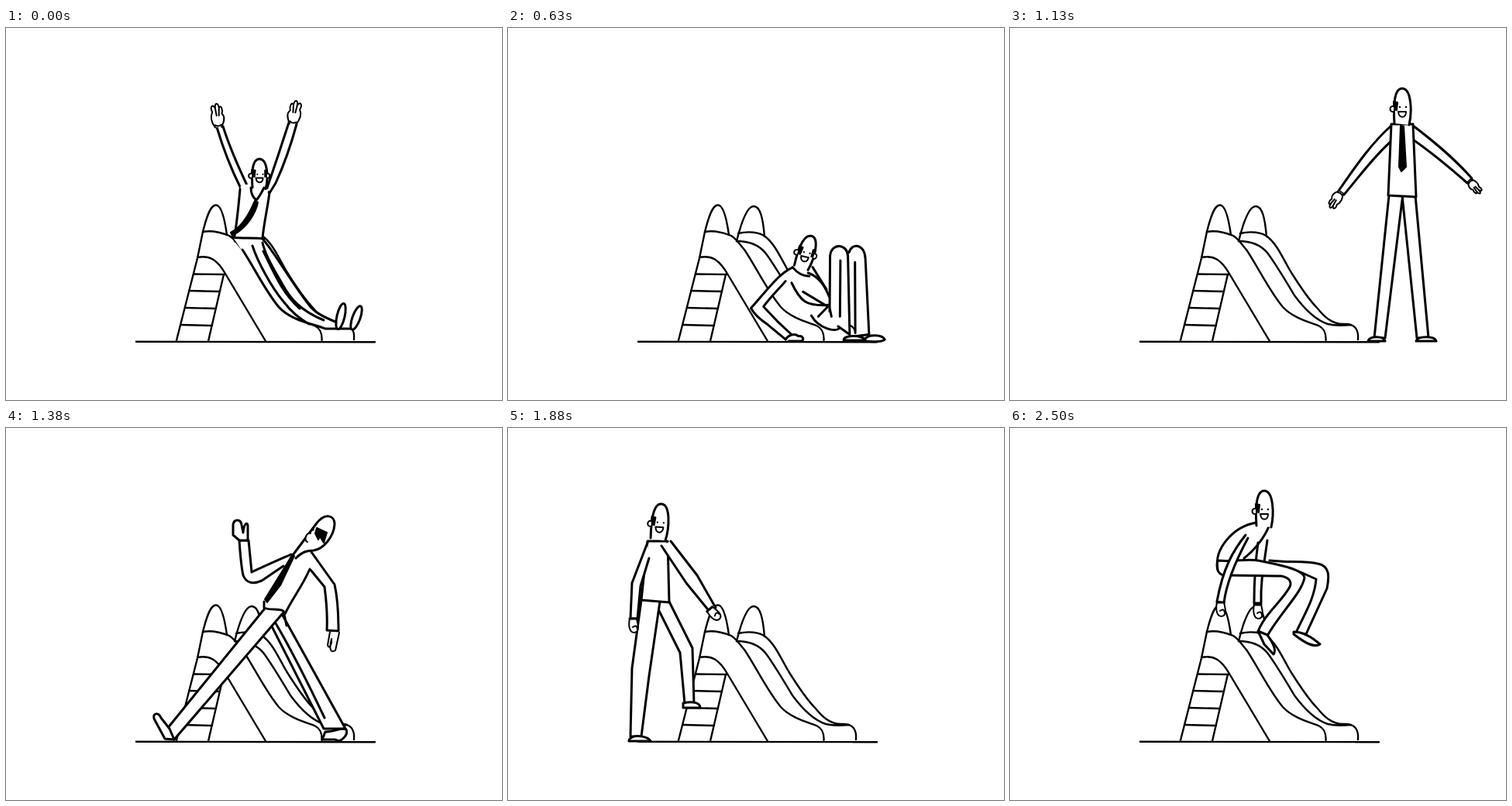
Animation of 640 by 480 pixels, one loop 2620 ms. Source, as an HTML page without scripts:

```html
<!DOCTYPE html>
<html lang="en">
<head>
<meta charset="utf-8">
<title>Playground slide</title>
<style>
html, body { margin: 0; width: 100%; height: 100%; overflow: hidden; background: #fff; }
svg { display: block; width: 100vw; height: 100vh; }
path, ellipse {
  fill: #fff; stroke: #000; stroke-width: 3;
  stroke-linecap: round; stroke-linejoin: round; vector-effect: non-scaling-stroke;
}
.slide path { stroke-width: 2.4; }
.n, .slide .n { fill: none; }
.f { stroke: none; }
.k { fill: #000; stroke-width: 2; }
.thin { stroke-width: 2; }
.dot { fill: #000; stroke: none; }
/* each pose is held for 130 or 120 ms in turn */
.play > * {
  visibility: hidden;
  animation: short 2620ms step-end infinite;
  animation-delay: calc((var(--t) - 2620) * 1ms);
}
.play > :nth-child(odd):not(:last-child) { animation-name: long; }
@keyframes short { 0% { visibility: visible; } 4.58015% { visibility: hidden; } }
@keyframes long { 0% { visibility: visible; } 4.96183% { visibility: hidden; } }
</style>
</head>
<body>
<svg viewBox="0 0 640 480">
<defs>
  <g id="head">
    <path d="M-10 45C-11 30-12 0 0 0S13 30 9 47"/>
    <path class="k" d="M-11 17l5 1-1 10-4-1z"/>
    <path class="thin" d="M-11 23c-6-1-6 8 0 7"/>
    <circle class="dot" cx="-3" cy="24" r="1.2"/>
    <circle class="dot" cx="5" cy="24" r="1.2"/>
    <path class="thin" d="M-5 30h10c0 9-9 9-10 0z"/>
  </g>
  <g id="ear">
    <path class="k" d="M11 17l-3 1v10l3-1z"/>
    <path class="thin" d="M11 23c5-1 5 8 0 7"/>
  </g>
  <g id="palm">
    <path class="thin" d="M-4 0C-9-8-9-15-6-20C-9-27-5-31-2-25C-2-32 2-32 3-25C6-29 8-22 6-17C10-13 8-6 4 0"/>
    <path class="n thin" d="M-2-25l1 10M3-25l-1 10M-4-3q4 3 8 0"/>
  </g>
  <g id="grip">
    <path class="thin" d="M-5-10C-7 0-5 8 1 8C8 7 6-2 4-10M-1 1q5-4 6 2"/>
    <path class="n" d="M-5-10L4-10"/>
  </g>

  <!-- upper body with both arms raised -->
  <g id="cheer">
    <path class="f" d="M302 207L295 270H332L340 210 328 200z"/>
    <path d="M272 128C280 155 292 185 303 207L313 207C300 180 288 152 280 127"/>
    <path d="M375 124C368 150 358 178 348 200L340 213 336 209C346 180 356 150 365 122"/>
    <path class="f" d="M303 203L300 225 332 225 339 209 325 200z"/>
    <path class="n" d="M302 208C300 230 298 250 295 268M340 212C338 230 333 250 331 271M292 270C305 272 318 270 333 272"/>
    <use href="#palm" x="274" y="128" transform="rotate(-5 274 128)"/>
    <use href="#palm" transform="translate(370 124) rotate(9) scale(-1 1)"/>
    <g transform="translate(327 169) scale(.9 .82)"><use href="#head"/><use href="#ear"/></g>
    <path class="n" d="M316 206C316 213 319 219 323 222C327 218 330 212 333 206"/>
    <path class="k" d="M321 223L325 225C322 240 311 255 300 263L292 268 290 264C304 257 314 240 321 223z"/>
  </g>

  <g id="glide">
    <path class="f" d="M293 270H331C350 298 375 335 392 360L428 379V389C400 386 370 380 354 362L314 302z"/>
    <path class="f" d="M405 383l45-12v18l-42 2z"/>
    <path class="n" d="M331 272C345 287 366 325 390 356C398 367 408 372 427 380M331 277C335 295 348 315 358 333C366 347 378 364 410 377M332 288C345 314 356 342 379 362M318 281C324 300 342 334 358 353C368 366 380 376 391 382M305 286C318 305 335 340 352 360C368 378 398 382 412 388H445"/>
    <ellipse cx="432" cy="372" rx="5" ry="17" transform="rotate(13 432 372)"/>
    <ellipse cx="452" cy="374" rx="5" ry="16" transform="rotate(20 452 374)"/>
    <use href="#cheer"/>
  </g>

  <g id="land">
    <path d="M382 333C400 350 420 366 445 372L508 384 506 399 425 396C390 392 362 365 343 334"/>
    <path class="n" d="M372 340C395 370 430 384 505 391"/>
    <ellipse cx="506" cy="386" rx="5" ry="17" transform="rotate(13 506 386)"/>
    <ellipse cx="520" cy="387" rx="5" ry="16" transform="rotate(18 520 387)"/>
    <use href="#cheer" x="50" y="62"/>
  </g>

  <g id="bump">
    <path d="M408 368L462 330C476 322 484 332 485 345L496 400H482L466 352 430 388"/>
    <path d="M378 370C375 388 395 392 422 388L446 350C456 338 470 346 470 360L478 400H463L454 370"/>
    <path d="M463 400c12-5 22-3 23 4h-23zM484 400c14-5 24-2 25 4h-24z"/>
    <use href="#cheer" x="82" y="99"/>
  </g>

  <g id="sit">
    <path class="f" d="M408 300L430 305 434 384C425 389 412 388 405 380z"/>
    <path class="n" d="M407 312V360L426 358M405 362V378C411 388 426 390 434 383"/>
    <path d="M412 297C400 297 396 315 391 328L363 395 373 397 396 344C403 326 406 320 406 310"/>
    <path d="M363 395C355 398 354 404 360 403H379C380 397 377 395 371 396M361 403q2-6 6-3"/>
    <use href="#head" x="424" y="253"/>
    <path d="M454 400L455 293C457 273 477 274 477 294L467 400"/>
    <path d="M434 400C437 370 428 335 430 300C428 275 452 271 455 292L452 400"/>
    <path class="n" d="M440 310L437 396M459 296V398"/>
    <path class="k" d="M427 308l3 24 11 22-3 3-11-12z"/>
    <path d="M432 404V398C445 396 463 395 464 404zM462 400C475 395 484 397 483 405"/>
  </g>

  <g id="recline">
    <path class="f" d="M358 314L380 318 410 358 428 386C418 394 400 390 394 380L340 338z"/>
    <path class="n" d="M378 321C393 326 401 336 409 351M383 314L404 341M358 333C372 356 380 362 410 360M374 344L408 362 397 374"/>
    <path class="n" d="M388 373C398 387 424 397 428 385"/>
    <path d="M356 315C340 322 325 345 309 364C316 374 326 380 333 384L358 402 365 396 345 380 325 362C333 350 342 341 350 331"/>
    <path d="M358 402C362 395 370 395 374 398C380 397 383 403 378 404H362"/>
    <g transform="translate(377 276) rotate(12) scale(1 .86)"><use href="#head"/><use href="#ear"/></g>
    <path class="n" d="M357 314C364 321 372 325 380 325"/>
    <path d="M428 296C430 284 447 285 450 304L465 396 447 398"/>
    <path d="M411 368L404 300C404 284 424 285 427 300L440 396 424 386"/>
    <path class="n" d="M418 306L425 374M437 308L447 394M411 365L414 374"/>
    <path d="M433 403C432 396 457 396 461 403zM460 402C464 395 482 396 486 402C482 406 470 405 460 404"/>
  </g>

  <g id="rise">
    <path d="M440 324L490 318C510 316 508 332 504 342L482 398H468L484 342"/>
    <path d="M440 238C420 250 408 290 404 330L440 338C450 300 464 270 460 246z"/>
    <path d="M406 328C400 348 420 350 462 344L448 398H462L484 340C490 322 470 318 438 326"/>
    <use href="#head" transform="translate(463 200) rotate(15)"/>
    <path d="M436 248C425 280 440 310 468 332L477 325C456 305 446 285 448 256"/>
    <use href="#grip" transform="translate(478 336) rotate(-45)"/>
    <path d="M446 404v-6c14-3 28-1 29 6zM467 400c14-4 27-3 28 4"/>
  </g>

  <g id="stand">
    <path d="M520 126C545 145 570 165 596 194L590 200C565 178 540 158 520 144"/>
    <path d="M492 126C465 150 445 180 424 210L431 215C452 190 470 165 492 146"/>
    <use href="#palm" transform="translate(593 197) rotate(140) scale(.7)"/>
    <use href="#palm" transform="translate(427 212) rotate(215) scale(.8)"/>
    <path d="M506 216L525 400H540L523 216M489 216L470 400H484L506 222"/>
    <path d="M492 124L488 216 524 218 520 124z"/>
    <use href="#head" x="506" y="78"/>
    <path class="k" d="M504 126l4 1 3 52-6 6-3-6z"/>
    <path d="M462 404c2-7 20-7 22 0zM524 404c2-7 24-7 26 0z"/>
  </g>

  <g id="stride">
    <path d="M341 252L410 388 438 388 356 240"/>
    <path class="n" d="M348 252C368 286 392 334 411 374"/>
    <path d="M408 402L412 392C424 392 432 386 439 389C442 396 434 402 430 404L424 402z"/>
    <path d="M333 234L208 388 217 402 358 238"/>
    <path d="M217 402L205 401 191 375C189 367 197 367 200 374L211 388z"/>
    <path d="M368 163C350 171 334 178 317 186L313 145 301 145C302 160 303 176 306 190C310 200 318 202 330 197L358 178"/>
    <path d="M301 145L293 138V125C294 117 303 117 304 125L306 135C307 122 313 119 312 130V145z"/>
    <path class="f" d="M367 166L333 232 359 237 394 180 393 158z"/>
    <path class="n" d="M392 182C382 205 368 222 360 240M333 224V232C342 236 350 232 358 236L362 255"/>
    <path d="M394 160L424 202C428 220 429 242 429 262L414 261C415 240 413 220 411 205L393 183"/>
    <path class="thin" d="M418 263L415 280C417 287 421 278 420 272C416 288 420 290 425 287L430 264"/>
    <path d="M367 168L400 124C411 109 424 112 424 124C423 140 410 156 397 158C388 158 382 160 374 168"/>
    <path class="k" d="M401 129l13 6-4 13-5-8-2 4-4-8z"/>
    <path class="thin" d="M393 136c-6-2-9 10-4 11"/>
    <circle class="dot" cx="396" cy="131" r="1.8"/>
    <path class="k" d="M368 166l4-1-18 38-17 22-3-4z"/>
  </g>

  <g id="away">
    <path d="M148 215C143 250 140 285 134 315L115 375 127 378C130 350 146 325 150 300L164 222"/>
    <path d="M112 376C111 385 120 396 125 400C132 401 132 394 128 390L122 376z"/>
    <path d="M163 222C170 250 178 290 183 320L197 398 215 402C208 360 200 335 196 310L180 220"/>
    <path class="n" d="M166 226C175 260 180 290 184 318"/>
    <path d="M215 403L190 402C184 399 190 397 213 399z"/>
    <path class="f" d="M160 138L148 213 184 222 187 144z"/>
    <path d="M160 137C145 155 125 175 113 195L91 226 98 231 120 200 158 152"/>
    <path class="thin" d="M91 226C84 236 76 238 70 244C69 249 76 243 80 242C74 252 82 251 90 239L98 231z"/>
    <path d="M187 145C205 165 222 182 235 202L259 231 253 236 220 200 186 157"/>
    <path class="thin" d="M253 236L265 251C271 253 274 245 271 242C272 236 265 237 259 231zM262 243q7-7 8 0"/>
    <path class="n" d="M157 150C154 170 155 192 153 212M185 155L184 223M148 213C160 212 172 217 185 222"/>
    <path d="M166 138C166 115 164 94 174 94S182 112 184 138"/>
    <path class="k" d="M166 113l15-1v11l-15 2z"/>
    <path class="thin" d="M181 117c6-2 5 6 1 6"/>
    <path class="n" d="M160 137C168 142 178 145 187 145"/>
    <path class="k" d="M185 183l4 8 9 9-5 3-8-6z"/>
  </g>

  <g id="step">
    <path d="M190 226L222 290 228 356H240L238 284 208 224"/>
    <path d="M226 361v-6c14-3 22 0 22 6z"/>
    <path d="M172 222L160 310 158 398H172L182 320 196 224"/>
    <path d="M156 404c0-9 24-8 28 0z"/>
    <path d="M180 146L172 222 208 225 206 146z"/>
    <path d="M180 148L160 200 158 246H167L171 204 182 168"/>
    <use href="#grip" x="162" y="256"/>
    <path d="M198 152L230 200 261 238 268 232 244 190 210 146"/>
    <use href="#grip" transform="translate(267 241) rotate(-40)"/>
    <use href="#head" transform="translate(198 98) rotate(5)"/>
  </g>

  <g id="climb">
    <path d="M197 230C212 255 226 272 240 315L236 285 212 234"/>
    <path d="M233 150C245 158 255 172 264 187L301 243 309 238C298 220 285 200 275 183L242 146"/>
    <use href="#grip" transform="translate(310 248) rotate(-35)"/>
    <path class="f" d="M226 137C195 135 172 160 163 187L197 202 228 186V140z"/>
    <path d="M163 187C148 208 162 224 190 227C205 229 222 232 226 237C233 250 234 285 242 318L247 298 240 235C239 221 238 210 230 208L197 202"/>
    <path class="n" d="M229 138C195 130 172 162 163 187C173 191 185 197 197 202C202 187 214 180 221 167"/>
    <path class="k" d="M225 175h3v31h-3z"/>
    <path d="M217 142C221 160 227 174 234 190L258 240 266 234 246 190 230 150"/>
    <use href="#grip" transform="translate(265 246) rotate(-25)"/>
    <path class="n" d="M258 318L269 337"/>
    <ellipse class="n" cx="252" cy="313" rx="5" ry="14" transform="rotate(8 252 313)"/>
    <ellipse class="n" cx="273" cy="331" rx="5" ry="14" transform="rotate(14 273 331)"/>
    <use href="#head" transform="translate(249 106) rotate(17) scale(1 .87)"/>
  </g>

  <g id="perch">
    <path d="M335 171C360 174 380 171 397 175C413 178 412 192 409 207L382 266 369 264C380 240 393 220 395 195L375 186"/>
    <path d="M366 263C380 263 392 272 400 279C392 284 380 277 366 266z"/>
    <path class="f" d="M318 122C285 125 265 155 268 182L303 172 334 140z"/>
    <path d="M320 148C317 170 315 195 315 226H324C323 198 328 175 332 145"/>
    <use href="#grip" x="320" y="238"/>
    <path d="M269 171C290 173 306 168 320 171C345 176 378 182 380 193C377 212 350 237 332 268L320 263C328 240 350 225 361 205C364 198 360 193 350 191C330 191 305 190 280 190C270 191 265 184 268 171"/>
    <path class="n" d="M318 122C288 127 263 156 268 182M334 127C328 142 315 158 302 168"/>
    <path d="M320 262L328 279 340 292C344 287 340 278 332 267z"/>
    <path d="M304 138C288 158 275 180 267 224L276 226C279 200 292 170 307 142"/>
    <use href="#grip" x="272" y="235"/>
    <use href="#head" x="328" y="81"/>
  </g>
</defs>

<g class="slide">
  <path class="n" d="M168 404.7L476 405.2"/>
  <path d="M295 275C300 255 308 230 317 230S329 247 331 269"/>
  <path class="n" d="M297 265C310 262 325 263 333 270C345 280 352 297 362 314C372 330 385 350 397 362C405 372 415 382 430 382C446 381 450 390 449 402M295 275C308 275 322 278 332 290C342 303 355 325 367 345C378 360 392 376 410 382Q422 385 440 383"/>
  <path class="n" d="M220 403L247 297 254 263C259 243 264 228 271 228.5S282 245 285 267"/>
  <path class="n" d="M254 263C265 261 278 264 288 268C296 273 300 281 305 286C318 305 335 340 352 360C365 374 385 379 398 384C406 388 408 394 407.5 403"/>
  <path class="n" d="M247 296C262 293 272 298 283 317L335 404M281 318L261 404M242 317.5L282 318M236 339L276 340M231 361L271 362M226 383L266 384"/>
</g>

<g class="play">
  <use href="#glide" style="--t:0"/>
  <use href="#land" style="--t:130"/>
  <use href="#bump" style="--t:250"/>
  <use href="#sit" style="--t:380"/>
  <use href="#sit" style="--t:500" transform="translate(0 404) skewX(4) scale(1 .97) translate(0 -404)"/>
  <use href="#recline" style="--t:630" transform="translate(0 404) skewX(-6) scale(1 1.06) translate(0 -404)"/>
  <use href="#recline" style="--t:750" transform="translate(0 404) skewX(-2) scale(1 1.02) translate(0 -404)"/>
  <use href="#recline" style="--t:880"/>
  <use href="#rise" style="--t:1000"/>
  <use href="#stand" style="--t:1130"/>
  <use href="#stride" style="--t:1250" transform="matrix(.6 0 0 1.06 220 -24)"/>
  <use href="#stride" style="--t:1380"/>
  <use href="#away" style="--t:1500" transform="matrix(.85 0 0 1 105 0)"/>
  <use href="#away" style="--t:1630"/>
  <use href="#step" style="--t:1750" transform="translate(-8 404) skewX(2) translate(0 -404)"/>
  <use href="#step" style="--t:1880"/>
  <use href="#climb" style="--t:2000" transform="translate(-10 14)"/>
  <use href="#climb" style="--t:2130"/>
  <use href="#climb" style="--t:2250" transform="rotate(5 285 245) translate(2 -8)"/>
  <use href="#perch" style="--t:2380" transform="rotate(-8 295 237)"/>
  <use href="#perch" style="--t:2500"/>
</g>
</svg>
</body>
</html>
```
